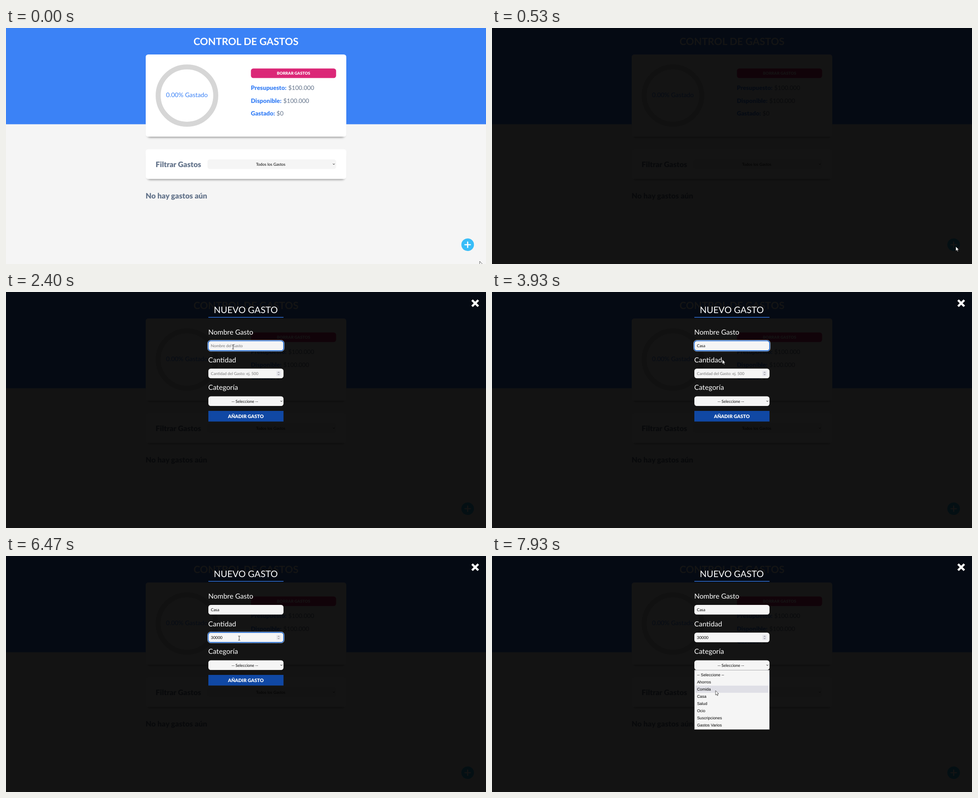
Recreate the animation shown at these times as an HTML page. Size 1065 px wide and 526 px high, loop 8000 ms.

```html
<!DOCTYPE html>
<html lang="es">
<head>
<meta charset="utf-8">
<title>Control de gastos</title>
<style>
  html, body { margin: 0; width: 100%; height: 100%; overflow: hidden; background: #f5f5f5; }
  svg { display: block; width: 1065px; height: 526px; }
  text { font-family: Lato, sans-serif; text-rendering: geometricPrecision; white-space: pre; }
  .list text { font-family: "Liberation Sans", Arial, sans-serif; }
</style>
</head>
<body>
<svg id="stage" viewBox="0 0 1065 526" xmlns="http://www.w3.org/2000/svg"></svg>
<script>
const LOOP = 8000, TICK = 200 / 3;
const BLUE = '#3b82f6', GRAY = '#64748b', PALE = '#f5f5f5';
const ROW_TOP = 257, ROW_H = 15.93;

const rect = (x, y, w, h, fill, r = 0, extra = '') =>
  `<rect x="${x}" y="${y}" width="${w}" height="${h}" rx="${r}" fill="${fill}" ${extra}/>`;
const text = (s, x, y, size, fill, weight = 400, anchor = 'start', extra = '') =>
  `<text x="${x}" y="${y}" font-size="${size}" fill="${fill}" font-weight="${weight}" text-anchor="${anchor}" ${extra}>${s}</text>`;
const chevron = (x, y, s = 2, color = '#000', w = 1) =>
  `<path d="M${x - s} ${y - s / 2}l${s} ${s}l${s} ${-s}" fill="none" stroke="${color}" stroke-width="${w}"/>`;
const card = (y, h) =>
  rect(314, y + 9.5, 437, h - 8, '#000', 5, 'opacity=".45" filter="url(#soft)"') + rect(310, y, 445, h, '#fff', 5.5);
const summary = (label, value, x, y) =>
  text(label, 543.3, y, 13.35, BLUE, 900) + text(value, x, y, 13.35, GRAY);
const field = y => rect(449, y, 166.7, 21.6, PALE, 5.3);
const ring = (id, y) => `<g id="${id}">` +
  rect(447.5, y - 1.5, 169.7, 24.6, 'none', 6.5, 'stroke="#e8f0fa" stroke-width=".9"') +
  rect(448.7, y - .3, 167.3, 22.2, 'none', 5.5, 'stroke="#1668dc" stroke-width="1.6"') + '</g>';

const options = ['-- Seleccione --', 'Ahorros', 'Comida', 'Casa', 'Salud', 'Ocio', 'Suscripciones', 'Gastos Varios'];

document.getElementById('stage').innerHTML = `
<defs><filter id="soft" x="-10%" y="-20%" width="120%" height="140%"><feGaussianBlur stdDeviation="2.4"/></filter></defs>
${rect(0, 0, 1065, 526, PALE)}
${rect(0, 0, 1065, 214.5, BLUE)}
${text('CONTROL DE GASTOS', 532.4, 37.6, 22.26, '#fff', 700, 'middle')}
${card(59, 183.3)}
<circle cx="401.5" cy="150.6" r="63.9" fill="none" stroke="#d6d6d6" stroke-width="11.1"/>
${text('0.00% Gastado', 401.4, 153.8, 13.9, BLUE, 400, 'middle')}
${rect(543.4, 90.2, 189, 21.4, '#db2777', 5.3)}
${text('BORRAR GASTOS', 638, 104.3, 8.9, '#fff', 900, 'middle')}
${summary('Presupuesto:', '$100.000', 626.3, 137.8)}
${summary('Disponible:', '$100.000', 615.2, 166.5)}
${summary('Gastado:', '$0', 600.3, 195.1)}
${card(270.2, 66.2)}
${text('Filtrar Gastos', 332, 309.9, 16.7, GRAY, 900)}
${rect(447, 292.7, 285.5, 21.5, PALE, 5.3)}
${text('Todos los Gastos', 587.3, 306.7, 8.9, '#000', 400, 'middle')}
${chevron(727.3, 303.4)}
${text('No hay gastos aún', 309.8, 380, 16.7, GRAY, 900)}
<circle cx="1024.3" cy="483" r="14" fill="#38bdf8"/>
<path d="M1018.3 483h12M1024.3 477v12" stroke="#fff" stroke-width="2.6" stroke-linecap="round"/>
<g id="overlay">${rect(0, 0, 1065, 526, '#000', 0, 'opacity=".92"')}</g>
<path id="close" d="M1034.1 18.1l13.8 13.8m0-13.8l-13.8 13.8" stroke="#fff" stroke-width="4.8"/>
<g id="form">
  ${text('NUEVO GASTO', 532, 47.1, 20, '#fff', 400, 'middle')}
  ${rect(449, 55.8, 166.7, 1.3, BLUE)}
  ${text('Nombre Gasto', 448.8, 95, 15.6, '#fff')}
  ${field(109)}
  ${text('', 454.5, 123.2, 8.9, '#000', 400, 'start', 'id="name"')}
  ${text('Cantidad', 448.8, 156.7, 15.6, '#fff')}
  ${field(170.7)}
  ${text('', 454.5, 184.9, 8.9, '#000', 400, 'start', 'id="amount"')}
  ${rect(600, 176, 9.6, 11, '#e6e6ec', 1)}
  <g transform="rotate(180 604.8 179.3)">${chevron(604.8, 179.3, 1.7, '#555', .9)}</g>${chevron(604.8, 183.9, 1.7, '#555', .9)}
  ${text('Categoría', 448.8, 218.4, 15.6, '#fff')}
  ${field(232.4)}
  ${text('-- Seleccione --', 530, 246.6, 8.9, '#000', 400, 'middle')}
  ${chevron(611, 243.3)}
  ${rect(449, 265, 166.7, 23.7, '#1048a4', 0, 'id="submit"')}
  ${text('AÑADIR GASTO', 532.2, 280.6, 10.55, '#fff', 900, 'middle')}
</g>
${ring('nameRing', 109)}${ring('amountRing', 170.7)}
${rect(0, 0, .8, 10.6, '#000', 0, 'id="caret"')}
<g id="popup" class="list">
  ${rect(449.2, 254.2, 166.2, 132.5, PALE, 0, 'stroke="#9a9a9f" stroke-width=".6"')}
  ${rect(451.5, ROW_TOP, 161.5, ROW_H, '#dfdfe6', 0, 'id="highlight"')}
  ${options.map((s, i) => text(s, 454.9, 268.1 + i * ROW_H, 8.9, '#000')).join('')}
</g>
<path id="arrow" d="M0 0V10L2.3 7.9L3.8 11.3L5.4 10.6L3.9 7.2H7Z" fill="#fff" stroke="#111" stroke-width=".7"/>
<path id="beam" d="M-2.3-4.6H-.5L0-4.2L.5-4.6H2.3M0-4.2V4.2M-2.3 4.6H-.5L0 4.2L.5 4.6H2.3" fill="none" stroke="#222" stroke-width=".9"/>`;

const el = {};
document.querySelectorAll('#stage [id]').forEach(e => el[e.id] = e);

// Pointer stops: time, x, y
const path = [
  [0, 1051, 520], [467, 1029, 487], [600, 1029, 487], [867, 735, 367], [1000, 735, 367],
  [1200, 578, 237], [1533, 528, 160], [1867, 499, 123], [2000, 499, 123], [2133, 503.8, 122.6],
  [3333, 503.8, 122.6], [3533, 506, 143], [3667, 506, 143], [3933, 511, 150.5], [4267, 517, 177],
  [6400, 517, 177], [6933, 520, 226], [7000, 520, 226], [7200, 519, 240], [7400, 519, 240], [7933, 496, 300]
];
const nameKeys = [2870, 3070, 3200, 3330];
const amountKeys = [5130, 5330, 5470, 5600, 5930];
const caretResets = [1870, ...nameKeys, 4330, ...amountKeys];

const clamp = v => Math.max(0, Math.min(1, v));
const show = (e, on) => e.setAttribute('display', on ? 'inline' : 'none');

function pointerAt(t) {
  const i = path.findIndex(p => p[0] > t);
  if (i < 0) return path[path.length - 1].slice(1);
  const a = path[i - 1], b = path[i], k = (t - a[0]) / (b[0] - a[0]);
  return [a[1] + (b[1] - a[1]) * k, a[2] + (b[2] - a[2]) * k];
}

function typeInto(e, value, placeholder) {
  e.textContent = value || placeholder;
  e.setAttribute('fill', value ? '#000' : '#757575');
}

function draw(ms) {
  const t = Math.floor((ms + 5) / TICK) * TICK;
  const since = time => t + 6 >= time;
  const typed = (word, keys) => word.slice(0, keys.filter(since).length);

  const open = since(530);
  show(el.overlay, open);
  show(el.close, since(600));

  const f = clamp((t - 1040) / 300);
  el.form.setAttribute('opacity', f * f * (3 - 2 * f));
  const hover = 1 - clamp((t - 1200) / 300);
  const mix = (a, b) => Math.round(a + (b - a) * hover);
  el.submit.setAttribute('fill', `rgb(${mix(16, 59)},${mix(72, 130)},${mix(164, 246)})`);

  const name = typed('Casa', nameKeys), amount = typed('30000', amountKeys);
  typeInto(el.name, name, 'Nombre del Gasto');
  typeInto(el.amount, amount, 'Cantidad del Gasto: ej. 500');

  const onAmount = since(4330) && !since(7200);
  const onName = since(1870) && !since(4330);
  show(el.nameRing, onName);
  show(el.amountRing, onAmount);

  const reset = caretResets.filter(since).pop();
  show(el.caret, (onName || onAmount) && (t - reset) % 1066 < 530);
  const value = onAmount ? amount : name, input = onAmount ? el.amount : el.name;
  el.caret.setAttribute('x', 454.3 + (value ? input.getComputedTextLength() : 0));
  el.caret.setAttribute('y', onAmount ? 176.3 : 114.5);

  const [x, y] = pointerAt(t);
  show(el.popup, since(7270));
  const row = Math.max(0, Math.floor((y - ROW_TOP) / ROW_H));
  el.highlight.setAttribute('y', ROW_TOP + row * ROW_H);

  const overInput = since(1200) && x > 449 && x < 615 && (y > 109 && y < 130.6 || y > 170.7 && y < 192.3);
  show(el.beam, overInput);
  show(el.arrow, !overInput);
  (overInput ? el.beam : el.arrow).setAttribute('transform', `translate(${x} ${y})`);
}

const start = performance.now();
function tick() {
  draw((performance.now() - start) % LOOP);
  requestAnimationFrame(tick);
}
tick();
</script>
</body>
</html>
```
